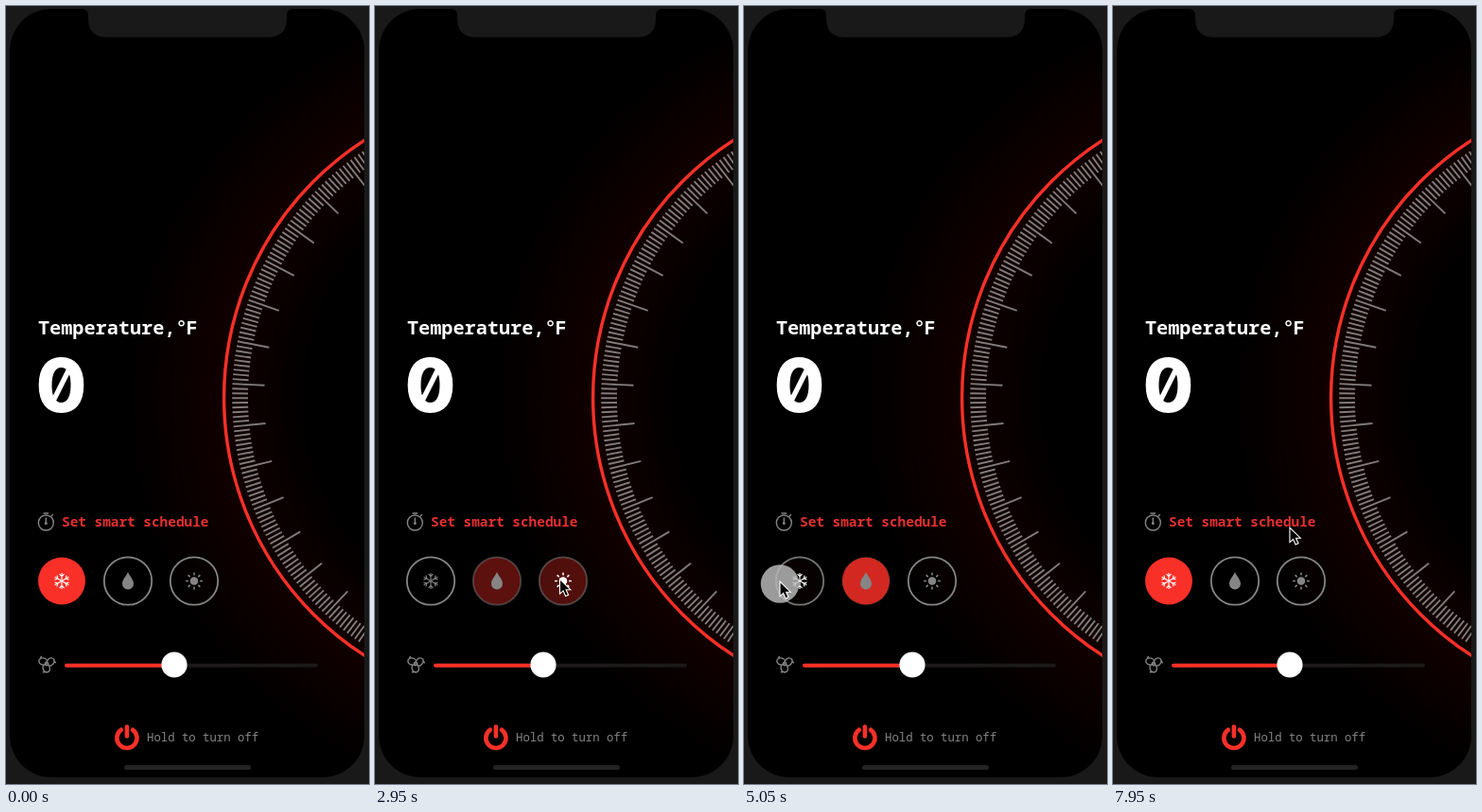
Write an HTML page that moves like this. It is 384 by 822 pixels and loops after 8000 ms.

```html
<!DOCTYPE html>
<html lang="en">
<head>
<meta charset="utf-8">
<title>Thermostat</title>
<style>
html, body { margin: 0; width: 100%; height: 100%; overflow: hidden; background: #191919; }
svg { display: block; width: 100vw; height: 100vh; }
text { font-family: "Noto Sans Mono", monospace; }
.sans { font-family: Inter, sans-serif; font-feature-settings: "zero"; }
.line { fill: none; stroke: #858585; stroke-linecap: round; }
.icon { color: #858585; }
.on .icon { color: #fff; }
</style>
</head>
<body>
<svg viewBox="0 0 384 822">
  <defs>
    <clipPath id="screen"><rect x="4" y="3" width="375" height="812" rx="44"/></clipPath>
    <radialGradient id="glow" gradientUnits="userSpaceOnUse" cx="554" cy="414" r="430">
      <stop offset=".54" stop-color="#000"/>
      <stop offset=".75" stop-color="#110000"/>
      <stop offset=".83" stop-color="#0c0000"/>
      <stop offset="1" stop-color="#000"/>
    </radialGradient>
  </defs>

  <g clip-path="url(#screen)">
    <rect width="384" height="822"/>
    <circle cx="554" cy="414" r="430" fill="url(#glow)"/>
    <circle cx="554" cy="414" r="323.4" fill="none" stroke="#f93028" stroke-width="3.4"/>
    <path id="ticks" fill="none" stroke="#817a7a" stroke-width="1.9"/>
  </g>
  <path fill="#191919" d="M80 0H304V3Q297 3 297 10V13Q297 33 277 33H107Q87 33 87 13V10Q87 3 80 3Z"/>

  <g fill="#fff" font-weight="700">
    <text x="34" y="347" font-size="20.2">Temperature,<tspan class="sans" x="181" font-weight="400">°</tspan><tspan x="190.5">F</tspan></text>
    <text class="sans" x="58.5" y="429" font-size="78" font-weight="800" text-anchor="middle">0</text>
  </g>

  <g class="line" stroke-width="1.4">
    <circle cx="42.3" cy="546" r="8"/>
    <path d="M42.3 541V546M40 536H44.6M48 539L49.5 537.5"/>
    <circle cx="42.3" cy="546.5" r=".8"/>
  </g>
  <text x="59" y="550" font-size="14.4" font-weight="600" fill="#e53030">Set smart schedule</text>

  <g id="modes"></g>

  <g id="fan" class="line" stroke-width="1.3" transform="translate(43 695) scale(1.06)"></g>
  <path d="M64 696.7H328" stroke="#1c1919" stroke-width="4" stroke-linecap="round"/>
  <path id="fill" stroke="#f93028" stroke-width="4" stroke-linecap="round"/>
  <circle id="knob" cy="696" r="13.6" fill="#fff"/>

  <path fill="none" stroke="#f93028" stroke-width="4.6" stroke-linecap="round"
    d="M121.7 764.8A10.6 10.6 0 1 0 134.1 764.8M127.9 761.5V771.5"/>
  <text x="149" y="777" font-size="12.3" fill="#858585">Hold to turn off</text>
  <rect x="125" y="802" width="134" height="5" rx="2.5" fill="#232323"/>

  <circle id="press" r="20.3" fill="#b9b9b9" fill-opacity=".84"/>
  <path id="cursor" d="M0 0V15.6L3.6 12.3L6.1 18L9.1 16.7L6.6 11.2H11.3Z" stroke="#fff" stroke-width="1.1"/>
</svg>

<script>
const LOOP = 8000, FADE = 200;
const $ = id => document.getElementById(id);

// Cursor stops: time, x, y
const path = [
  [1100, 392, 650], [1600, 124, 607], [1850, 124, 607], [2800, 195.5, 605.5],
  [3050, 195.5, 605.5], [3800, 144.3, 610], [4250, 144.3, 610], [4950, 38, 608],
  [5200, 38, 608], [5850, 178, 698], [5950, 178, 694], [6500, 210, 690],
  [7150, 115.5, 709.6], [7640, 188, 711], [7700, 188, 711], [7950, 187, 551]
];
// Mode selections: time, mode
const picks = [[-FADE, 0], [1750, 1], [2856, 2], [3950, 1], [5030, 0]];
const presses = [[1710, 1800], [2810, 2900], [3900, 3990], [4990, 5080], [5890, 7700]];

const ease = u => u * u * (3 - 2 * u);
const clamp = u => Math.max(0, Math.min(1, u));

function cursorAt(t) {
  const next = path.findIndex(stop => stop[0] > t);
  if (next === 0) return path[0].slice(1);
  if (next < 0) return path.at(-1).slice(1);
  const [t0, x0, y0] = path[next - 1], [t1, x1, y1] = path[next];
  const u = ease((t - t0) / (t1 - t0));
  return [x0 + (x1 - x0) * u, y0 + (y1 - y0) * u];
}

function drawTicks() {
  const perMark = 9, step = 8.232 / perMark;
  let d = "";
  for (let i = -7 * perMark; i <= 7 * perMark; i++) {
    const a = (-2.7 + i * step) * Math.PI / 180;
    const point = r => `${554 - r * Math.cos(a)} ${414 + r * Math.sin(a)}`;
    d += `M${point(314.8)}L${point(i % perMark ? 298 : 280.8)}`;
  }
  $("ticks").setAttribute("d", d);
}

const spin = (count, shape) => Array.from({ length: count }, (_, i) =>
  `<g transform="rotate(${i * 360 / count})">${shape}</g>`).join("");

function drawModes() {
  const icons = [
    `<g fill="none" stroke="currentColor" stroke-width="1.1">${spin(6, '<path d="M0 0V-8.5M-2.5 -7.3L0 -4.8L2.5 -7.3"/>')}</g>`,
    '<path fill="currentColor" d="M0 -9.5C1.5 -5.5 6 -1.5 6 3A6 6 0 0 1 -6 3C-6 -1.5 -1.5 -5.5 0 -9.5Z"/>',
    `<g fill="currentColor"><circle r="4.3"/>${spin(8, '<rect x="-.8" y="-9" width="1.6" height="3" rx=".6"/>')}</g>`
  ];
  $("modes").innerHTML = icons.map((icon, i) => `
    <g transform="translate(${59 + i * 70} 607.5)">
      <circle class="disc" r="25" fill="#f93028"/>
      <circle class="line" r="25.2" stroke-width="1.8"/>
      <g class="icon">${icon}</g>
    </g>`).join("");
}

function drawFan() {
  const blade = '<path d="M0 1C-5 -1 -5 7 0 8.5C3.5 8 4 4.5 2.5 2.5M-3.5 8.2H-2"/>';
  $("fan").innerHTML = spin(3, blade) + '<circle r="1.6"/>';
}

function renderModes(t) {
  const current = picks.findLastIndex(pick => pick[0] <= t);
  const [since, mode] = picks[current];
  const previous = current ? picks[current - 1][1] : -1;
  const u = clamp((t - since) / FADE);
  [...$("modes").children].forEach((button, i) => {
    const level = i === mode ? u : i === previous ? 1 - u : 0;
    button.classList.toggle("on", i === mode);
    button.querySelector(".disc").setAttribute("opacity", level ** 1.55);
    button.querySelector(".line").setAttribute("opacity", 1 - level);
  });
}

function render(t) {
  renderModes(t);
  const [x, y] = cursorAt(t);
  const [lagX, lagY] = cursorAt(t - 17);
  $("cursor").setAttribute("transform", `translate(${x} ${y})`);
  $("cursor").style.display = t < path[0][0] ? "none" : "";
  $("press").setAttribute("cx", lagX);
  $("press").setAttribute("cy", lagY + 2.5);
  $("press").style.display = presses.some(([a, b]) => t >= a && t < b) ? "" : "none";

  const knobX = t < 5890 ? 178 : cursorAt(Math.min(t, 7660) - 17)[0] - 1;
  $("knob").setAttribute("cx", knobX);
  $("fill").setAttribute("d", `M64 696.7H${knobX}`);
}

drawTicks();
drawModes();
drawFan();
const start = performance.now();
function frame() {
  render((performance.now() - start) % LOOP);
  requestAnimationFrame(frame);
}
frame();
</script>
</body>
</html>
```
